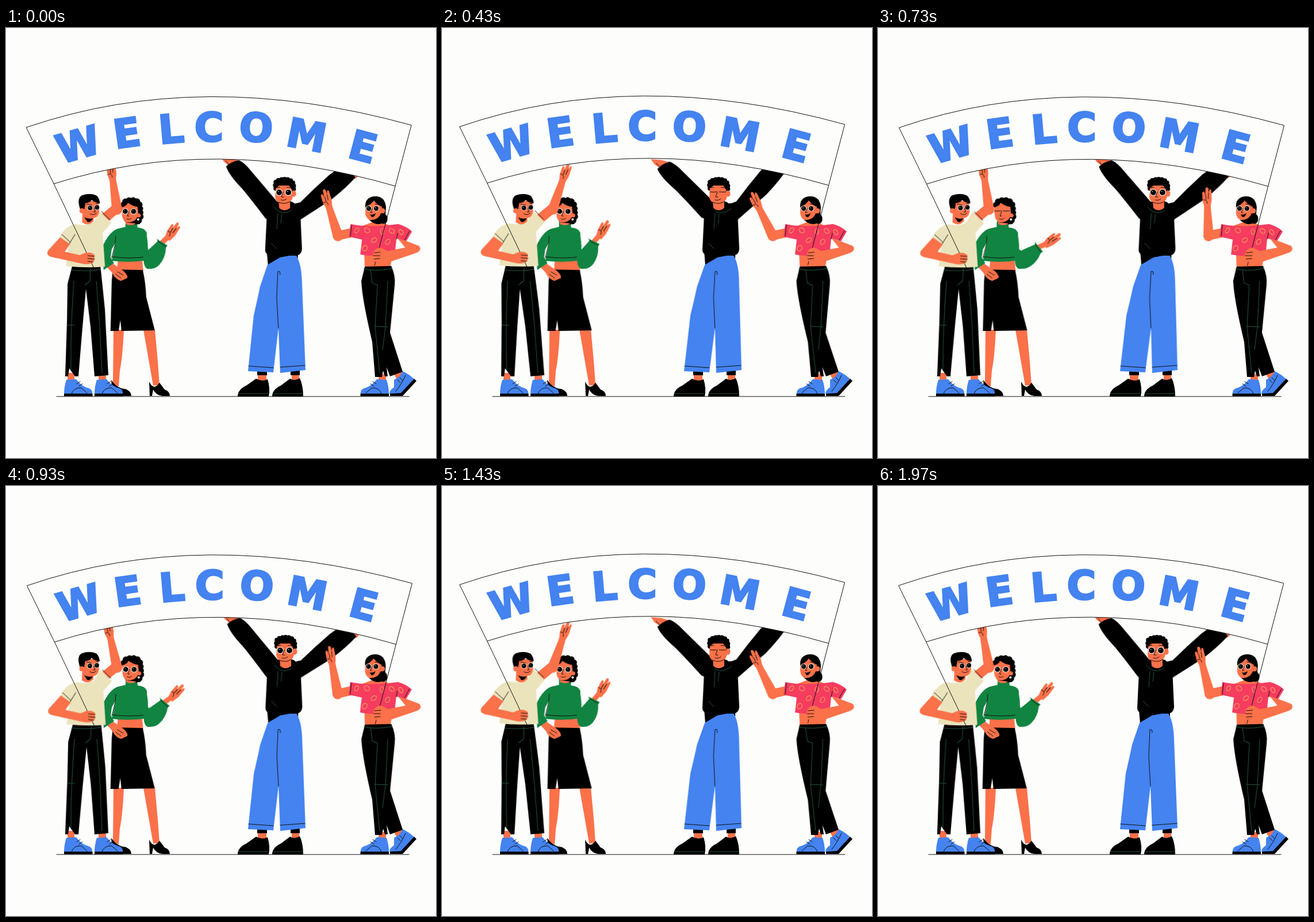
Write an HTML page that moves like this. It is 748 px wide and 748 px high and loops after 2000 ms.

```html
<!DOCTYPE html>
<html lang="en">
<head>
<meta charset="utf-8">
<title>Welcome</title>
<style>
  html, body { margin: 0; width: 100%; height: 100%; overflow: hidden; background: #fdfdfb; }
  svg { display: block; width: 100vw; height: 100vh; }
  .skin { fill: #fb7149; }
  .blue { fill: #4483f0; }
  .green { fill: #118441; }
  .cream { fill: #ebe3bb; }
  .pink { fill: #f63c5f; }
  .line { fill: none; stroke: #111; stroke-width: 1; stroke-linecap: round; }
  .seam { fill: none; stroke: #23583d; stroke-width: 1; }
  .limb { fill: none; stroke: #fb7149; stroke-linecap: round; }
  .curls { stroke: #000; stroke-linecap: round; stroke-linejoin: round; }
  .word { font: bold 69px "DejaVu Sans", sans-serif; text-anchor: middle; stroke: #4483f0; stroke-width: 3; }

  /* swings from pose --a (reached at time --p) to pose --b and back once a second */
  .sway { animation: sway .5s cubic-bezier(.364, 0, .636, 1) calc(var(--p) - 1s) infinite alternate; }
  @keyframes sway { from { transform: var(--a); } to { transform: var(--b); } }

  .hold { --p: 825ms; --a: translate(2.2px, .6px); --b: translate(-5.2px, -1.5px); }
  .lid { animation: blink 1s linear var(--late, -1s) infinite; }
  @keyframes blink {
    0%, 33% { transform: translateY(0); }
    39%, 49% { transform: translateY(15px); }
    64%, 100% { transform: translateY(0); }
  }
</style>
</head>
<body>
<svg viewBox="0 0 748 748">
  <defs>
    <clipPath id="eyeClip"><circle r="6.6"/></clipPath>
    <g id="eye">
      <circle r="6" fill="#fff"/>
      <circle r="4.9"/>
      <circle cx="-1.5" cy="-1.5" r=".8" fill="#fff"/>
    </g>
    <g id="lid">
      <rect x="-8" y="-30" width="16" height="22" class="skin"/>
      <path class="line" d="M-6-16Q0-15 6-16"/>
    </g>
    <g id="hand">
      <path class="skin" d="M-5 3L-8-9-8-22Q-7-26-4-24L-3-18-2-30Q0-34 3-30L3-23 5-28Q8-29 8-25L8-10 5 3Z"/>
      <path class="line" d="M-2-19V-11M3-22L2-12M-7-10Q0-12 0-4"/>
    </g>
    <g id="forearm">
      <path class="skin" d="M-9 1L-5.5-54H5.5L9 1A9 9 0 0 1-9 1Z"/>
      <use href="#hand" y="-52"/>
    </g>
    <g id="shoe">
      <path class="blue" d="M4 1L21 0Q31 13 44 16Q50 19 49 26H0Q0 13 4 1Z"/>
      <path class="line" d="M22 8l6-4M26 12l6-4M13 25Q17 14 30 15L40 24"/>
      <rect y="25" width="49.500" height="4.500"/>
    </g>
  </defs>

  <path class="line" stroke="#444" d="M88 641H701"/>

  <!-- woman in green -->
  <g>
    <path class="skin" d="M187 525H205Q203 572 198 596L196 624 186 618Z"/>
    <path class="skin" d="M239 525H259L264 580 267 621 256 622Z"/>
    <path d="M183 612Q193 627 208 628Q218 632 218 640H195L184 624Z"/>
    <path d="M249 615Q257 632 267 617L276 629Q285 632 285 640H272Q261 639 256 629L254 640H250Z"/>
    <g class="sway" style="--p:450ms;--a:translate(1.5px);--b:translate(-.2px)">
      <path class="skin" d="M195 402H237L239 424H193Z"/>
      <path d="M186 420L238 421Q243 442 244 468L259 526 201 527 199 508 196 527H182L184 440Z"/>
    </g>
    <g class="sway" style="--p:930ms;--a:translate(1px);--b:translate(-3.500px)">
      <path class="skin" d="M173 414L184 409 204 423Q212 431 210 435L199 440Q188 436 184 426Z"/>
      <path class="line" d="M193 424L203 430M190 428L199 435"/>
      <path class="green" d="M207 337H227L228 347Q241 348 244 356L245 404Q214 409 183 405L190 373 183 385 181 399 187 409 169 421 168 400Q163 386 170 374Q181 353 194 349L207 346Z"/>
      <path class="line" d="M190 362L189 376L183 400M184 398Q214 402 244 398M239 366L241 399"/>
      <path class="green" d="M236 350Q246 353 246 385L266 398Q261 420 246 419Q239 418 238 400Z"/>
      <g transform="translate(252 405)">
        <g class="sway" style="--p:240ms;--a:rotate(-18deg);--b:rotate(18deg)">
          <path class="limb" stroke-width="9" d="M18-30L30-41"/>
          <use href="#hand" transform="translate(30 -39) rotate(34)"/>
          <path class="green" d="M-7-17L12-34 10-38 29-26 26-23Q25-5 14 7Q3 18-9 11Z"/>
          <path class="line" d="M12-34L26-24"/>
        </g>
      </g>
    </g>
    <g class="sway" style="--p:810ms;--a:translate(1.500px);--b:translate(-3.500px)">
      <path class="curls" stroke-width="11" stroke-dasharray="0 7" d="M204 308Q207 299 216 300Q232 298 233 312L234 328 230 337"/>
      <path d="M202 311Q207 295 226 300L236 320 233 341 222 342 206 336Z"/>
      <path class="skin" d="M208 326H225V341Q216 345 208 341Z"/>
      <path d="M208 338Q221 338 224 327L226 340Z"/>
      <path class="skin" d="M201 312Q210 310 212 304Q222 311 229 311L230 322Q229 336 215 338Q203 338 202 326Z"/>
      <g transform="translate(207.500 319)"><use href="#eye" transform="scale(.9)"/><g clip-path="url(#eyeClip)"><g class="lid" style="--late:-750ms"><use href="#lid"/></g></g></g>
      <g transform="translate(222 319)"><use href="#eye" transform="scale(.9)"/><g clip-path="url(#eyeClip)"><g class="lid" style="--late:-750ms"><use href="#lid"/></g></g></g>
      <path class="line" d="M214 319L211 327H214M210 332Q215 334 218 331"/>
      <circle cx="231" cy="326" r="3.500" class="skin"/>
      <circle cx="230" cy="333" r="2" fill="#fff"/>
    </g>
  </g>

  <!-- man in the cream shirt -->
  <g>
    <path class="skin" d="M107 600H119V616H107ZM161 602H174V616H161Z"/>
    <use href="#shoe" x="101" y="611"/>
    <use href="#shoe" x="154" y="611"/>
    <g class="sway" style="--p:825ms;--a:skewX(-.66deg);--b:skewX(1.560deg);transform-origin:0 606px">
      <path d="M115 414H164Q167 440 172 490L178 604 154 606 147 520 139 454 133 520 126 606 120 606 110 592 108 606H103L106 510 107 445Z"/>
      <path class="seam" d="M118 440Q112 520 113 596M114 421Q138 424 164 420M147 418L146 440 137 447M106 517H119M157 440L163 520 167 600"/>
    </g>
    <path class="limb" stroke-width="17" d="M170 332L192 314"/>
    <g transform="translate(193 315)">
      <g class="sway" style="--p:365ms;--a:rotate(20deg);--b:rotate(-14deg)"><use href="#forearm"/></g>
    </g>
    <g class="sway hold">
      <path class="cream" d="M121 341Q138 345 152 338L163 319 183 339 168 356 172 415Q140 418 104 414L109 377 93 363Q104 344 121 341Z"/>
      <path class="line" d="M97 359L112 373M120 359L110 375M166 319L181 334"/>
    </g>
    <g class="sway" style="--p:30ms;--a:translate(.3px);--b:translate(-4px)">
      <path class="skin" d="M133 313H152V336Q143 346 132 338Z"/>
      <path d="M136 329Q142 333 151 331Q146 340 141 337Z"/>
      <path class="skin" d="M133 301H161L162 316Q162 330 150 331Q138 332 134 320Z"/>
      <path d="M129 316Q122 296 132 291Q147 286 158 292Q163 298 163 305Q153 304 149 299Q145 305 138 304L136 315Z"/>
      <circle cx="132" cy="318" r="4.500" class="skin"/>
      <use href="#eye" transform="translate(146 313) scale(.85)"/>
      <use href="#eye" transform="translate(158 312) scale(.8)"/>
      <path class="line" stroke-width="1.500" d="M140 306L149 308M156 306L161 305M153 313L155 320H152M146 323Q152 327 157 322"/>
    </g>
  </g>

  <!-- man in the hoodie -->
  <g>
    <path class="skin" d="M438 602H453V616H438ZM497 602H510V616H497Z"/>
    <path d="M437 594H454V604H437ZM495 594H511V604H495Z"/>
    <path d="M403 641Q403 629 418 622L435 610Q445 616 455 611Q460 627 457 641ZM463 641Q463 629 478 622L494 610Q503 615 511 609Q517 622 517 641Z"/>
    <path class="seam" d="M405 636H456M465 636H516"/>
    <g class="sway" style="--p:590ms;--a:skewX(-.85deg);--b:skewX(.15deg);transform-origin:0 598px">
      <path d="M454 390H508V404L456 413Z"/>
      <path class="blue" d="M455 412L477 399 504 394Q514 408 515 440L521 595 477 600 474 522 465 599 421 597 431 500Q438 470 442 450Z"/>
      <path class="line" d="M473 424L471 470 474 522M473 424Q477 421 477 429M422 588L465 591M477 590L520 587"/>
    </g>
    <g class="sway" style="--p:600ms;--a:translate(3px);--b:translate(-.500px)">
      <g transform="translate(460 318)">
        <g class="sway" style="--p:885ms;--a:translate(.6px) rotate(1.500deg);--b:translate(-4px, -3px) rotate(-4.500deg)">
          <path class="skin" d="M-88-94L-82-84-70-75-56-86-70-91Z"/>
          <path class="line" d="M-79-86L-74-80"/>
          <path d="M-78-76Q-70-84-56-87Q-47-84-34-68L14-13 4 20-8 14Q-36-22-50-38Q-73-61-78-76Z"/>
        </g>
      </g>
      <g transform="translate(500 318)">
        <g class="sway" style="--p:880ms;--a:rotate(2.300deg);--b:rotate(-7.500deg)">
          <path class="skin" d="M92-72L116-72 109-59 100-55Z"/>
          <path d="M-8-10L12-15Q36-40 61-63L86-82 107-60Q92-42 65-20L10 17Z"/>
        </g>
      </g>
      <path d="M454 322L466 305H502L512 320 515 384Q514 397 501 396L462 395Q450 395 451 384Z"/>
      <path class="seam" d="M466 311Q481 330 501 314M473 322L471 350M480 323L478 340M461 374L471 384"/>
    </g>
    <g class="sway" style="--p:775ms;--a:translate(4px);--b:translate(-5px)">
      <path class="curls" stroke-width="8" stroke-dasharray="0 5.500" d="M469 279Q466 266 474 265Q485 261 494 265Q502 268 500 282"/>
      <path d="M468 280L474 264 496 265 502 288H490Z"/>
      <path d="M463 308Q462 303 472 302H497Q505 306 502 314Q483 326 463 308Z"/>
      <path class="skin" d="M474 300H494V313Q484 321 475 313Z"/>
      <path class="skin" d="M469 279L475 274H492L497 281Q498 284 499 293Q496 306 484 306Q470 306 468 294Z"/>
      <path class="line" d="M474 303Q484 308 494 302"/>
      <ellipse cx="500.500" cy="288" rx="4" ry="5.500" class="skin"/>
      <g transform="translate(475 286)"><use href="#eye"/><g clip-path="url(#eyeClip)"><g class="lid"><use href="#lid"/></g></g></g>
      <g transform="translate(491 286)"><use href="#eye"/><g clip-path="url(#eyeClip)"><g class="lid"><use href="#lid"/></g></g></g>
      <path class="line" d="M470 278L476 277M488 277L494 278M482 285L479 294H483M478 299Q484 301 488 297"/>
    </g>
  </g>

  <!-- woman in the pink top -->
  <g>
    <path class="skin" d="M648 602H661V616H648ZM674 600L687 594 693 603 680 612Z"/>
    <use href="#shoe" transform="translate(666 611) scale(-1 1)"/>
    <path class="blue" d="M675 612Q686 607 690 597Q703 603 711 612L689 638 668 639Q665 631 675 625Z"/>
    <path class="line" d="M681 612L686 617M685 608L690 613M695 604Q688 620 678 632"/>
    <path d="M710 610L714 614 690 640H668V636L687 635Z"/>
    <g class="sway" style="--p:900ms;--a:skewX(-.1deg);--b:skewX(.5deg);transform-origin:0 606px">
      <path class="skin" d="M623 390H673L668 418H624Z"/>
      <path d="M624 415L670 414Q678 432 676 447L668 530 690 598 668 606 662 590 664 606H659L656 596 654 607H642L637 546Q619 470 618 440Z"/>
      <path class="seam" d="M622 419Q645 424 672 418M634 420L637 444 646 447M646 447L642 520 650 600M664 440L660 520 655 560M641 519L664 520"/>
    </g>
    <g class="sway" style="--p:80ms;--a:translate(.4px);--b:translate(-2.600px)">
      <path class="limb" stroke-width="16" d="M578 361L606 355"/>
      <g transform="translate(577 361)">
        <g class="sway" style="--p:262ms;--a:rotate(-34.500deg);--b:rotate(-2deg)"><use href="#forearm"/></g>
      </g>
      <path class="skin" d="M638 322H653V337L668 344Q644 354 620 344L639 337Z"/>
      <path class="pink" d="M599 341Q630 348 682 341Q697 345 706 354L696 371 679 366 676 396Q640 398 616 394L619 368 596 363Z"/>
      <g fill="none" stroke="#f4a45c" stroke-width="1.200">
        <ellipse cx="610" cy="352" rx="3" ry="5" transform="rotate(30 610 352)"/>
        <ellipse cx="628" cy="352" rx="5" ry="4" transform="rotate(40 628 352)"/>
        <ellipse cx="624" cy="383" rx="4" ry="5" transform="rotate(30 624 383)"/>
        <ellipse cx="640" cy="369" rx="5" ry="3.500" transform="rotate(-40 640 369)"/>
        <ellipse cx="654" cy="354" rx="3" ry="5"/>
        <ellipse cx="671" cy="353" rx="5" ry="3.500" transform="rotate(40 671 353)"/>
        <ellipse cx="687" cy="355" rx="3" ry="5" transform="rotate(-30 687 355)"/>
        <ellipse cx="664" cy="372" rx="3.500" ry="5" transform="rotate(30 664 372)"/>
      </g>
      <path class="line" d="M601 343L599 362M702 353L693 369M679 367L681 357"/>
    </g>
    <g class="sway" style="--p:100ms;--a:translate(.3px);--b:translate(-2.700px)">
      <path d="M625 311Q624 296 639 293Q659 291 661 312L660 324Q665 328 663 336Q660 342 654 340Q642 344 632 334Z"/>
      <path class="skin" d="M625 312Q635 307 640 300Q645 307 654 311L653 322Q650 334 638 335Q626 334 625 322Z"/>
      <circle cx="655" cy="318" r="4.500" class="skin"/>
      <path d="M634 334Q648 334 652 322L657 333Q650 340 641 339Z"/>
      <use href="#eye" transform="translate(631 314) scale(.85)"/>
      <use href="#eye" transform="translate(644 314) scale(.85)"/>
      <path class="line" d="M628 307L633 306M642 306L648 307M637 314L634 321H637"/>
      <path d="M633 324Q638 326 643 322Q641 330 636 329Z"/>
    </g>
  </g>

  <!-- banner -->
  <g class="sway hold">
    <path fill="#fdfdfb" stroke="#111" d="M35 173Q340 68 705 169L677 275Q360 183 83 271Z"/>
    <path class="line" d="M83 271L152 416M677 275L641 413"/>
    <g class="word blue">
      <text transform="translate(125 202) rotate(-16)" y="25">W</text>
      <text transform="translate(210 182) rotate(-8)" y="25">E</text>
      <text transform="translate(287 175) rotate(-5)" y="25">L</text>
      <text transform="translate(353 171.500)" y="25">C</text>
      <text transform="translate(435 172.500) rotate(4)" y="25">O</text>
      <text transform="translate(523 186) rotate(11)" y="25">M</text>
      <text transform="translate(621 206) rotate(15)" y="25">E</text>
    </g>
  </g>

  <!-- arms holding the poles -->
  <g class="sway hold">
    <path class="skin" d="M94 364L73 387Q69 395 78 398L128 409Q146 414 153 406L154 395Q149 389 138 391L128 395 102 389 111 376Z"/>
    <path class="line" d="M142 396L153 397M142 401L154 402M142 406L151 407"/>
  </g>
  <g class="sway" style="--p:860ms;--a:translate(1.300px);--b:translate(-3.800px)">
    <path class="skin" d="M681 366L697 371 718 379Q724 386 714 391L664 408Q648 411 640 405L638 391Q642 382 652 382L663 388 694 382Z"/>
    <path class="line" d="M640 391L651 390M639 396L650 396M640 402L650 401"/>
  </g>
</svg>
</body>
</html>
```
